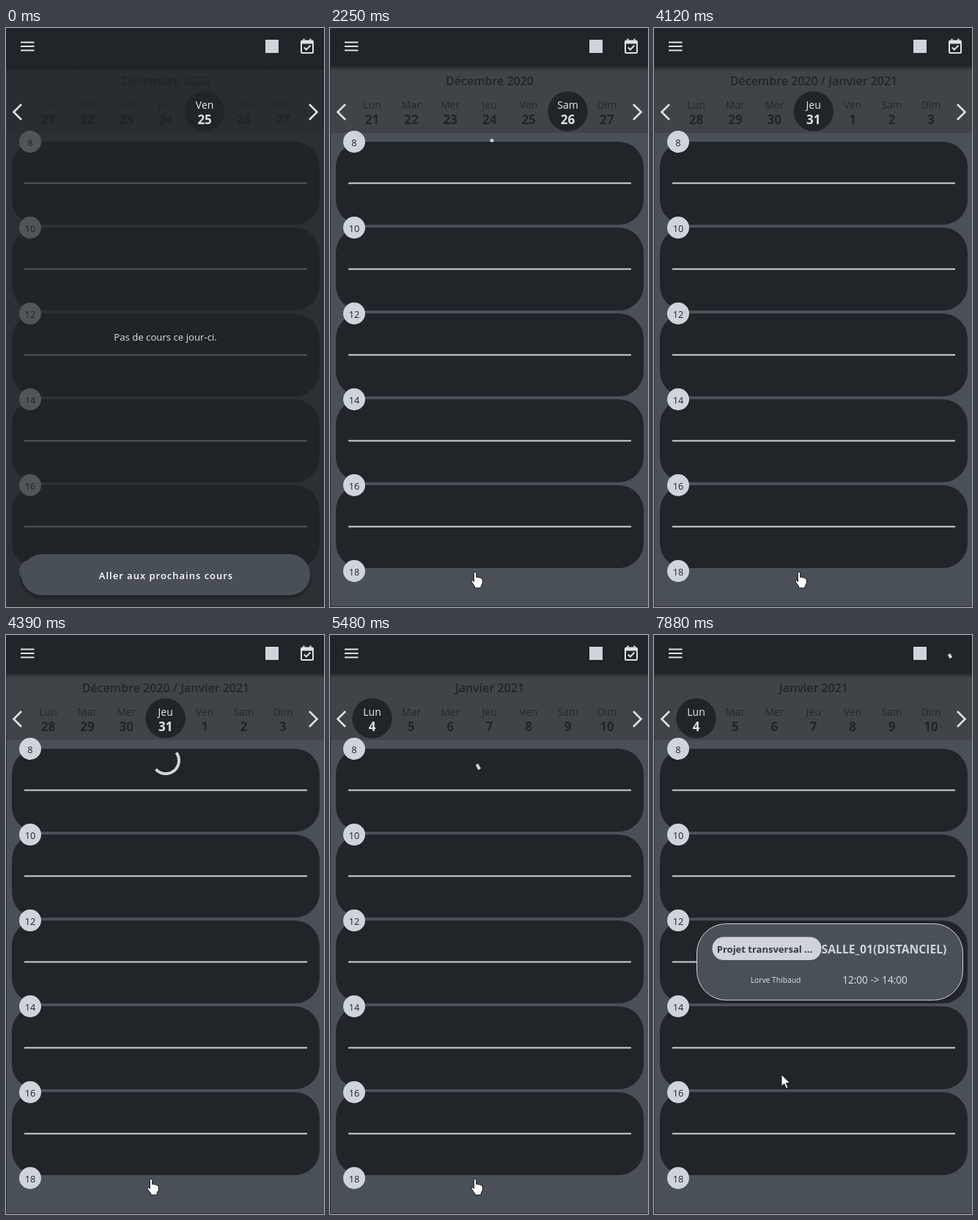
An HTML page for the animation above (7.99 s loop, 434 by 789 pixels).

```html
<!DOCTYPE html>
<html lang="fr">
<head>
<meta charset="utf-8">
<title>Agenda</title>
<style>
  html, body { margin: 0; width: 100%; height: 100%; overflow: hidden; background: #495057; }
  svg { display: block; width: 434px; height: 789px; font-family: "Open Sans", "Noto Sans", sans-serif; }
  text { text-anchor: middle; }
</style>
</head>
<body>
<svg id="stage" viewBox="0 0 434 789">
  <defs>
    <linearGradient id="shade" x2="0" y2="1">
      <stop offset="0" stop-color="#000" stop-opacity=".35"/>
      <stop offset="1" stop-color="#000" stop-opacity="0"/>
    </linearGradient>
    <filter id="lift" x="-10%" y="-20%" width="120%" height="160%">
      <feDropShadow dx="0" dy="3" stdDeviation="3" flood-opacity=".4"/>
    </filter>
  </defs>
  <rect width="434" height="789" fill="#495057"/>
  <rect y="53" width="434" height="90" fill="#404449"/>
  <text id="title" x="218" y="78" font-size="16" font-weight="600" fill="#212529"></text>
  <g id="days"></g>
  <g id="hours"></g>
  <g id="card">
    <rect x="58.5" y="393.5" width="363" height="104" rx="40" fill="#495057" stroke="#ced4da"/>
    <rect x="79.5" y="411.5" width="149" height="31.5" rx="15.7" fill="#ced4da"/>
    <text x="151" y="433" font-size="13" font-weight="700" fill="#343a40">Projet transversal ...</text>
    <text x="314" y="434" font-size="15.7" font-weight="700" fill="#ced4da">SALLE_01(DISTANCIEL)</text>
    <text x="166" y="474" font-size="10.3" fill="#dee2e6">Lorve Thibaud</text>
    <text x="301.5" y="475" font-size="13.6" fill="#dee2e6">12:00 -&gt; 14:00</text>
  </g>
  <path id="loader" fill="none" stroke="#ced4da" stroke-width="4" stroke-linecap="square"/>
  <rect id="veil" y="53" width="434" height="736" fill="#212529" opacity=".72"/>
  <g id="picked">
    <circle cy="113.5" r="27.2" fill="#212529"/>
    <text y="110" font-size="14" fill="#e9ecef"></text>
    <text y="131" font-size="17" font-weight="700" fill="#dee2e6"></text>
  </g>
  <path d="M21 104 10.500 114.500 21 125M414 104 424.500 114.500 414 125" fill="none" stroke="#dee2e6" stroke-width="2.600"/>
  <g id="empty">
    <text x="217.500" y="426" font-size="13.200" fill="#dee2e6">Pas de cours ce jour-ci.</text>
    <rect x="21" y="717" width="394" height="56" rx="28" fill="#495057" filter="url(#lift)"/>
    <text x="218.500" y="751" font-size="13" font-weight="600" letter-spacing="1" fill="#fff">Aller aux prochains cours</text>
  </g>
  <rect y="53" width="434" height="6" fill="url(#shade)"/>
  <rect width="434" height="53" fill="#212529"/>
  <path d="M20 19.500h18.500M20 25h18.500M20 30.500h18.500" stroke="#dee2e6" stroke-width="2"/>
  <rect x="354" y="16" width="18" height="18" fill="#ced4da"/>
  <g id="agenda" fill="none" stroke="#dee2e6" stroke-width="2">
    <rect x="403" y="17.500" width="16" height="16.500" rx="1.500"/>
    <path d="M403 19.500h16" stroke-width="4"/>
    <path d="M406.500 14.500v4M415.500 14.500v4"/>
    <path d="M406.800 26.500l3 3 5.700-5.700"/>
  </g>
  <path id="sync" fill="none" stroke="#dee2e6" stroke-width="4" stroke-linecap="square"/>
  <path d="M.5 53V788.500H434" fill="none" stroke="#2b2e33"/>
  <path id="arrow" d="M0 0V16l3.700-3.500 2.700 6.300 2.500-1.100-2.600-6.100h5.200z" fill="#fff" stroke="#111" stroke-width=".9"/>
  <path id="hand" d="M-1.700 1.500Q0-1.300 1.700 1.500V7.500Q3.300 6.300 4.600 8 6.300 7 7.400 8.700 9.800 8.200 10.200 11V15.500L8.200 19.500V22H-.5V20L-4.800 13.800Q-5.600 11.200-3.400 11.500L-1.700 13.500z" fill="#fff" stroke="#111"/>
</svg>
<script>
const LOOP = 7990, CLICKS = [2140, 4090], FOUND = 6540, NO_CLASS = 3800;
const NAMES = ['Lun', 'Mar', 'Mer', 'Jeu', 'Ven', 'Sam', 'Dim'];
const TITLES = ['Décembre 2020', 'Décembre 2020 / Janvier 2021', 'Janvier 2021'];
// [time, days after Monday 21 December]
const PICKS = [[0, 4], [2140, 5], [2470, 6], [2770, 7], [3760, 8], [3940, 9],
  [4090, 10], [4640, 11], [4850, 12], [5060, 13], [5270, 14]];
// [time, x, y] of the pointer's hot spot
const PATH = [[910, 190, 784], [1000, 192, 772], [1160, 197, 746], [1250, 198, 741],
  [5850, 198, 741], [6200, 192, 719.5], [6560, 192, 719.5], [6760, 193, 735],
  [7250, 185, 650], [7880, 174, 599]];

const $ = id => document.getElementById(id);
const show = (id, on) => $(id).setAttribute('visibility', on ? 'visible' : 'hidden');
const dayX = i => 57.5 + 53.4 * i;

function add(parent, tag, attrs, content = '') {
  const node = document.createElementNS('http://www.w3.org/2000/svg', tag);
  for (const k in attrs) node.setAttribute(k, attrs[k]);
  node.textContent = content;
  return parent.appendChild(node);
}

const numbers = NAMES.map((name, i) => {
  add($('days'), 'text', { x: dayX(i), y: 110, 'font-size': 14, fill: '#24282c' }, name);
  return add($('days'), 'text', { x: dayX(i), y: 131, 'font-size': 17, 'font-weight': 700, fill: '#212529' });
});

for (let i = 0; i < 5; i++) {
  const y = 155 + 117 * i;
  add($('hours'), 'rect', { x: 8, y, width: 420, height: 113, rx: 34, fill: '#212529' });
  add($('hours'), 'rect', { x: 25, y: y + 55.5, width: 386, height: 2, fill: '#ced4da' });
}
for (let i = 0; i < 6; i++) {
  const y = 155 + 117 * i;
  add($('hours'), 'circle', { cx: 33, cy: y, r: 15, fill: '#ced4da' });
  add($('hours'), 'text', { x: 33, y: y + 5.5, 'font-size': 12.8, fill: '#212529' }, 8 + 2 * i);
}

// cubic-bezier(.4, 0, .2, 1)
function ease(x) {
  if (x <= 0 || x >= 1) return x <= 0 ? 0 : 1;
  let lo = 0, hi = 1, s;
  for (let i = 0; i < 20; i++) {
    s = (lo + hi) / 2;
    const bx = 1.2 * s * (1 - s) ** 2 + .6 * s * s * (1 - s) + s ** 3;
    if (bx < x) lo = s; else hi = s;
  }
  return s * s * (3 - 2 * s);
}

// Indeterminate ring: the arc grows, then its tail catches up, while it all turns.
function ring(id, cx, cy, r, t) {
  const phase = t / 1333 % 1;
  const head = ease(phase * 2), tail = ease(phase * 2 - 1);
  const from = Math.PI * (-.5 + 1.5 * tail + 2 * t / 2222 + .5 * phase);
  const sweep = Math.max(1.5 * Math.PI * (head - tail), .02);
  const at = a => `${cx + r * Math.cos(a)} ${cy + r * Math.sin(a)}`;
  $(id).setAttribute('d', `M${at(from)}A${r} ${r} 0 ${+(sweep > Math.PI)} 1 ${at(from + sweep)}`);
}

let shown = -1;
function pick(day) {
  if (day === shown) return;
  shown = day;
  const week = Math.floor(day / 7), col = day % 7;
  $('title').textContent = TITLES[week];
  numbers.forEach((n, i) => n.textContent = new Date(2020, 11, 21 + 7 * week + i).getDate());
  const [disc, name, num] = $('picked').children;
  disc.setAttribute('cx', dayX(col));
  name.setAttribute('x', dayX(col));
  num.setAttribute('x', dayX(col));
  name.textContent = NAMES[col];
  num.textContent = numbers[col].textContent;
}

function pointer(t) {
  let i = PATH.findIndex(p => p[0] > t);
  if (i < 0) i = PATH.length;
  const a = PATH[Math.max(i - 1, 0)], b = PATH[i] || a;
  const k = b === a ? 0 : (t - a[0]) / (b[0] - a[0]);
  const hand = t >= 1000 && t < 5900;
  show('hand', hand);
  show('arrow', t >= 910 && !hand);
  $(hand ? 'hand' : 'arrow').setAttribute('transform',
    `translate(${a[1] + (b[1] - a[1]) * k} ${a[2] + (b[2] - a[2]) * k})`);
}

function draw(t) {
  const empty = t < CLICKS[0] || (t >= NO_CLASS && t < CLICKS[1]);
  const found = t >= FOUND;
  pick(PICKS.filter(p => p[0] <= t).pop()[1]);
  show('veil', empty);
  show('empty', empty);
  show('card', found);
  show('sync', found);
  show('agenda', !found);
  const second = t >= CLICKS[1];
  const spin = second ? (t - 4143) * 1.06 : t - 2213;
  show('loader', !empty && !found && spin >= 0);
  ring('loader', 218, 171, 18, Math.max(spin, 0));
  ring('sync', 411, 25, 8, Math.max((t - FOUND) * 1.06, 0));
  pointer(t);
}

let start;
function tick(now) {
  start ??= now;
  draw((now - start) % LOOP);
  requestAnimationFrame(tick);
}
draw(0);
requestAnimationFrame(tick);
</script>
</body>
</html>
```
